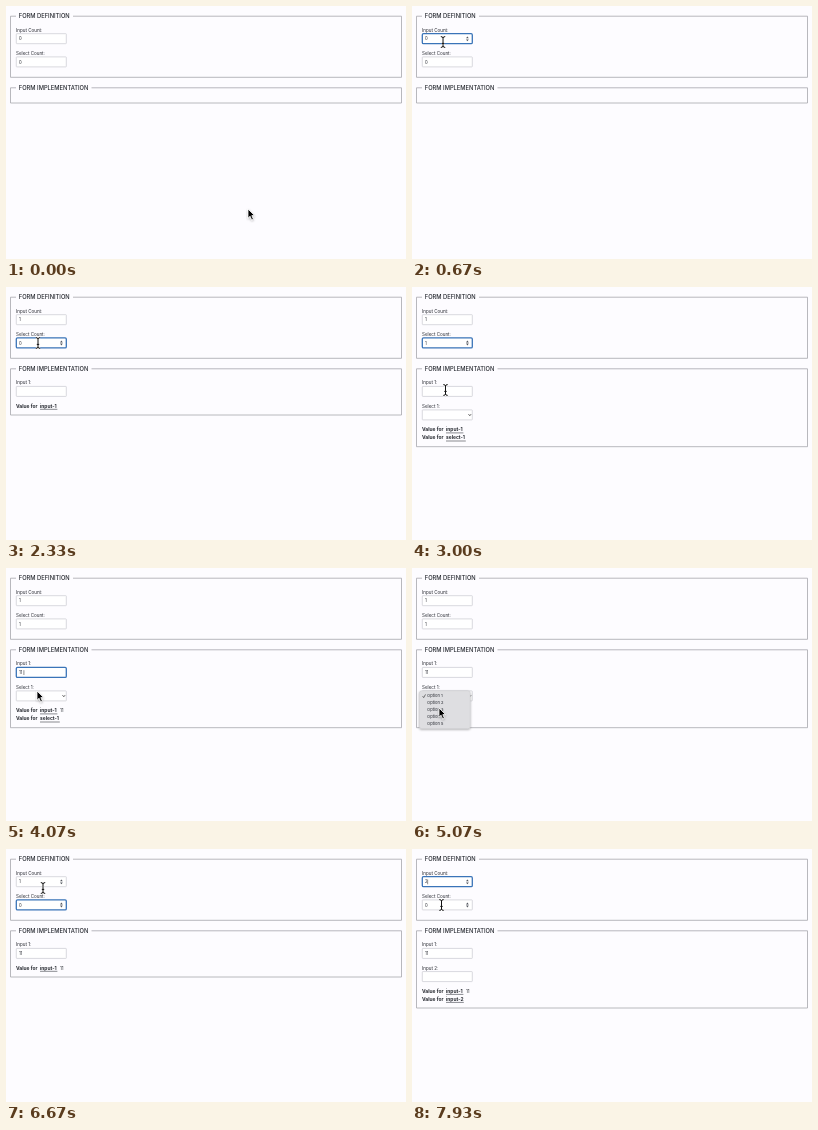
Recreate the animation shown at these times as an HTML page. Size 400 px wide and 253 px high, loop 8 s.

```html
<!DOCTYPE html>
<html lang="en">
<head>
<meta charset="utf-8">
<title>Dynamic form</title>
<style>
  html, body { margin: 0; width: 100%; height: 100%; overflow: hidden; background: #fdfcff; }
  svg { display: block; width: 100vw; height: 100vh; }
  text { font-family: Inter, "Open Sans", sans-serif; fill: #25282f; white-space: pre; }
</style>
</head>
<body>
<svg id="stage" viewBox="0 0 400 253">
  <defs>
    <filter id="soft" x="-30%" y="-30%" width="160%" height="170%">
      <feDropShadow dx="0" dy="1" stdDeviation="1.2" flood-color="#000" flood-opacity=".3"/>
    </filter>
  </defs>
  <g id="form"></g>
  <g id="pointer"></g>
</svg>
<script>
const LOOP = 8000, STEP = 200 / 3;
const form = document.getElementById('form');
const pointer = document.getElementById('pointer');

// Pointer stops: time, x, y
const path = [
  [70, 242, 203], [670, 31, 36], [1070, 31, 36], [1200, 31, 40],
  [1530, 31, 40], [2130, 32, 56], [2600, 32, 56], [2950, 33.5, 103],
  [3700, 33.5, 103], [4000, 31, 123], [4600, 31, 123], [4950, 27, 140],
  [5270, 27, 140], [5850, 30, 60], [6400, 30, 60], [6600, 37, 39],
  [6870, 37, 39], [7050, 38.5, 37.5], [7790, 38.5, 37.5], [7920, 29.5, 56]
];

// Value changes: time, value
const tracks = {
  focus: [[0, ''], [600, 'inputs'], [2330, 'selects'], [3040, 'input1'], [4400, ''], [6230, 'selects'], [6930, 'inputs']],
  inputs: [[0, '0'], [1190, '1'], [7330, '2']],
  selects: [[0, '0'], [2470, '1'], [6330, '0']],
  input1: [[0, ''], [3530, '1'], [3720, '11']],
  select1: [[0, ''], [5260, 'Option 3']],
  rows: [[0, ''], [1395, 'i'], [2730, 'is'], [6530, 'i'], [7795, 'ii']],
  menu: [[0, false], [4460, true], [5195, false]],
  caret: [[0, false], [930, true], [1900, false], [3530, true], [4390, false], [7270, true]]
};

const at = (name, t) => tracks[name].filter(k => k[0] <= t).pop()[1];
const ease = p => p * p * (3 - 2 * p);

function pointerAt(t) {
  const i = path.findIndex(k => k[0] > t);
  if (i === 0) return path[0].slice(1);
  if (i < 0) return path[path.length - 1].slice(1);
  const [t0, x0, y0] = path[i - 1], [t1, x1, y1] = path[i];
  const p = ease((t - t0) / (t1 - t0));
  return [x0 + (x1 - x0) * p, y0 + (y1 - y0) * p];
}

const text = (x, y, size, s, extra = '') =>
  `<text x="${x}" y="${y}" font-size="${size}" ${extra}>${s}</text>`;

const stroke = (d, color, width) =>
  `<path d="${d}" fill="none" stroke="${color}" stroke-width="${width}"/>`;

function fieldset(top, bottom, legendEnd, title) {
  return stroke(`M10 ${top}H4.5V${bottom}H395.5V${top}H${legendEnd}`, '#a6a6ac', .8) +
    text(12.8, top + 1.9, 5.75, title, 'font-weight="500"');
}

function box(y, value, focused, caret) {
  const w = value.length * 2.25;
  return `<rect x="10.3" y="${y}" width="50" height="10" rx="${focused ? 1.2 : .5}" fill="#fff"
      stroke="${focused ? '#3a74b8' : '#d0d0d6'}" stroke-width="${focused ? 1.3 : .8}"/>` +
    text(12.9, y + 6.6, 4.2, value) +
    (focused && caret ? stroke(`M${13.4 + w} ${y + 2.8}v4.8`, '#222', .5) : '');
}

const spinner = y =>
  `<path d="M54 ${y + 4.5}l1.4 -1.8l1.4 1.8zM54 ${y + 5.7}l1.4 1.8l1.4 -1.8z" fill="#50545c"/>`;

const label = (y, s) => text(10, y - 2.2, 4.55, s);

function result(y, name, end, value) {
  return text(10, y, 4.9, 'Value for', 'font-weight="700"') +
    text(34, y, 4.9, name, 'font-weight="700"') +
    stroke(`M34 ${y + 1.8}H${end}`, '#3a3d45', .6) +
    text(end + 2.6, y, 4.3, value);
}

function menu() {
  let s = `<rect x="7.3" y="122.7" width="51" height="38" rx="2.5" fill="#dedee1"
      stroke="#c2c2c6" stroke-width=".4" filter="url(#soft)"/>` +
    stroke('M10.6 128.2l1.1 1.4l1.8 -3.2', '#222', .6);
  for (let i = 0; i < 5; i++) s += text(15, 129.4 + 7 * i, 4.1, `Option ${i + 1}`);
  return s;
}

function drawForm(t, x, y) {
  const focus = at('focus', t), caret = at('caret', t), rows = at('rows', t);
  const field = (name, top) => box(top, at(name, t), focus === name, caret);
  const counter = (name, top) => {
    const over = x > 10 && x < 61 && y >= top && y < top + 11.5;
    return field(name, top) + (over || focus === name ? spinner(top) : '');
  };
  const bottom = { '': 97, i: 128, is: 159.7, ii: 159 }[rows];

  let s = fieldset(10.2, 71.3, 67, 'FORM DEFINITION') +
    label(27.8, 'Input Count:') + counter('inputs', 27.7) +
    label(50.9, 'Select Count:') + counter('selects', 50.9) +
    fieldset(81.8, bottom, 85.5, 'FORM IMPLEMENTATION');

  if (rows) {
    const first = { i: 120.5, is: 144.1, ii: 143.6 }[rows];
    s += label(99.5, 'Input 1:') + field('input1', 99.4) +
      result(first, 'input-1', 51.4, at('input1', t));
    if (rows === 'is') {
      s += label(122.7, 'Select 1:') + box(122.9, at('select1', t)) +
        stroke('M56.5 127.2l1.3 1.5l1.3 -1.5', '#333', .8) +
        result(152.2, 'select-1', 53.8, at('select1', t));
    }
    if (rows === 'ii') {
      s += label(122.7, 'Input 2:') + box(122.6, '') + result(151.6, 'input-2', 51.8, '');
    }
  }
  form.innerHTML = s + (at('menu', t) ? menu() : '');
}

function drawPointer(x, y) {
  const beam = x > 10 && x < 61 && [28, 51, 99].some(top => y >= top && y < top + 11.4);
  const ibeam = 'M-2.2 -5.4Q0 -5.4 0 -4Q0 -5.4 2.2 -5.4M0 -4V4M-2.2 5.4Q0 5.4 0 4Q0 5.4 2.2 5.4M-1.2 1.4H1.2';
  const arrow = 'M0 0V9.2L2.1 7.2L3.7 10.9L5.4 10.2L3.8 6.6H6.6Z';
  pointer.setAttribute('transform', `translate(${x} ${y})`);
  pointer.innerHTML = beam
    ? stroke(ibeam, '#fff', 2) + stroke(ibeam, '#111', 1)
    : `<path d="${arrow}" fill="#000" stroke="#fff" stroke-width=".8" filter="url(#soft)"/>`;
}

let last = -1;
function render(ms) {
  const n = Math.floor((ms % LOOP + 4) / STEP);
  if (n !== last) {
    last = n;
    const t = n * STEP, [x, y] = pointerAt(t);
    drawForm(t, x, y);
    drawPointer(x, y);
  }
}

const start = performance.now();
function tick() {
  render(performance.now() - start);
  requestAnimationFrame(tick);
}
tick();
</script>
</body>
</html>
```
